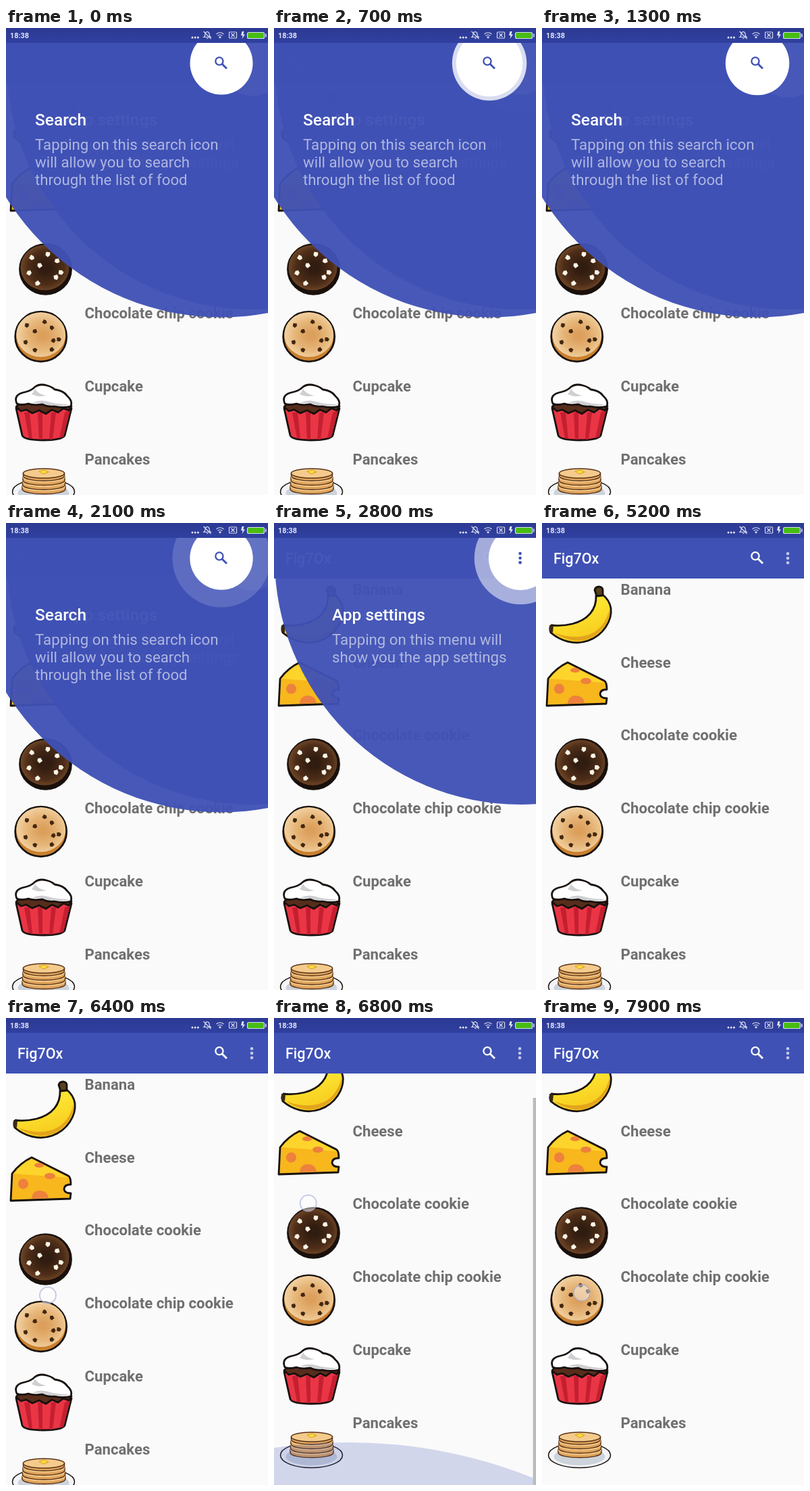
These frames come from a looping animation (388x690 px, 8 s). An HTML page:

```html
<!DOCTYPE html>
<html lang="en">
<head>
<meta charset="utf-8">
<title>Food list prompts</title>
<style>
  html, body { margin: 0; width: 100%; height: 100%; overflow: hidden; background: #fafafa; }
  svg { display: block; width: 388px; height: 690px; font-family: Roboto, "Noto Sans", sans-serif; }
  .label { font-size: 22.15px; font-weight: 700; fill: #6f6f6f; }
  .head { font-size: 24.5px; font-weight: 500; fill: #fff; }
  .body { font-size: 22.25px; fill: #fff; fill-opacity: .58; }
  .ink { stroke: #17110e; stroke-width: 2.8; stroke-linejoin: round; stroke-linecap: round; }
</style>
</head>
<body>
<svg viewBox="0 0 388 690">
  <defs>
    <clipPath id="listArea"><rect y="82" width="388" height="608"/></clipPath>
    <linearGradient id="peel" x1=".2" y1="0" x2=".6" y2="1">
      <stop offset=".4" stop-color="#fde22f"/><stop offset="1" stop-color="#f6c91c"/>
    </linearGradient>
    <radialGradient id="cocoa" cx=".52" cy=".5">
      <stop offset=".2" stop-color="#301c10"/><stop offset=".75" stop-color="#4d2d18"/><stop offset="1" stop-color="#6b4325"/>
    </radialGradient>
    <radialGradient id="dough" cx=".54" cy=".52">
      <stop offset=".15" stop-color="#dc9f5c"/><stop offset=".65" stop-color="#e6b679"/><stop offset="1" stop-color="#f0cd9c"/>
    </radialGradient>
    <linearGradient id="bar" x2="0" y2="1">
      <stop offset="0" stop-color="#2c3a93"/><stop offset="1" stop-color="#3040a0"/>
    </linearGradient>
    <g id="lens" fill="none" stroke-width="2.3">
      <circle cx="-2.6" cy="-2.7" r="5.6"/><path d="M1.6 1.5 8.4 8.3" stroke-width="2.9"/>
    </g>
    <g id="dots"><circle cy="-6.7" r="2.3"/><circle r="2.3"/><circle cy="6.7" r="2.3"/></g>
  </defs>

  <rect width="388" height="690" fill="#fafafa"/>
  <g clip-path="url(#listArea)">
    <g id="list">
      <g id="banana">
        <path class="ink" fill="url(#peel)" d="M80 107C81 128 68 143 45 149Q28 153 14 151Q10 155 13 162C27 174 48 181 68 174C91 166 104 144 102 126Q100 114 90 106Z"/>
        <path fill="#e3a41b" d="M18 162C34 173 52 177 67 172C87 165 101 146 100 128C95 147 84 161 66 166Q44 172 18 162Z"/>
        <path class="ink" fill="#59421d" stroke-width="2" d="M81 108 78 99Q79 94 85 94 90 95 90 99L90 107Z"/>
        <path fill="#3b2a14" d="M11 151 17 152 16 162 11 160Z"/>
      </g>
      <g id="cheese">
        <path class="ink" fill="#f7b71d" d="M9 230Q21 214 38 206L92 233Q96 235 96 246Q86 246 86 253Q87 259 96 259L95 267 7 270Z"/>
        <path fill="#fdd42b" d="M11 230Q23 215 38 208L93 236Z"/>
        <g fill="#ed813d">
          <ellipse cx="49" cy="217.500" rx="7" ry="3.600"/><ellipse cx="65" cy="233.500" rx="8" ry="4.500"/>
          <circle cx="25.500" cy="245" r="7.600"/><path d="M38 267Q39 255 50 255T63 266Z"/>
        </g>
      </g>
      <g id="darkCookie">
        <ellipse class="ink" cx="58.500" cy="356.500" rx="38" ry="36.800" fill="#1c100a"/>
        <ellipse cx="57.500" cy="354" rx="36" ry="33.500" fill="url(#cocoa)"/>
        <g id="whiteChips" fill="#fff5e6"/>
      </g>
      <g id="paleCookie">
        <ellipse class="ink" cx="51.700" cy="456" rx="38" ry="36.800" fill="#c9802f"/>
        <ellipse cx="51.700" cy="453" rx="36.500" ry="33" fill="url(#dough)"/>
        <g id="darkChips" fill="#43270f"/>
      </g>
      <g id="cupcake">
        <path class="ink" fill="#ea3545" d="M15 562 24 602Q27 609 55 609T87 602L97 562Z"/>
        <path fill="#c41f30" d="M27 568 34 606 39 607 35 568ZM47 568 49 608H54L54 568ZM67 568 64 608 69 608 74 568ZM87 568 79 606 85 604 95 565Z"/>
        <path class="ink" stroke-width="1.600" fill="#572d1b" d="M15 560Q18 552 54 555T97 559L93 565 85 562 77 568 68 564 59 570 49 565 39 569 30 564 22 566Z"/>
        <path class="ink" stroke-width="2.200" fill="#fff" d="M16 555Q11 543 24 539Q38 536 42 531Q49 525 60 528Q68 530 72 534Q86 536 91 544Q99 551 96 559Q84 562 72 559Q61 560 54 556Q41 558 33 555Q23 558 16 555Z"/>
        <path fill="#cfcfd3" d="M43 533Q47 541 60 543 47 546 38 541 41 538 43 533ZM38 554Q50 548 62 552T94 556Q84 560 72 557 61 558 54 554Z"/>
      </g>
      <g id="pancakes">
        <ellipse class="ink" cx="55.500" cy="685" rx="46" ry="18.500" style="stroke-width:1.500px" fill="#f2f4f7"/>
        <ellipse cx="55.500" cy="687" rx="38" ry="13" fill="#ccd3db"/>
        <g id="stack" stroke="#5a3318" stroke-width="1.500"/>
        <path fill="#ffdf38" stroke="#d29a20" d="M49 655 57 653 63 656 55 659Z"/>
      </g>
      <g id="labels" class="label"/>
    </g>
    <circle id="glow" cx="110" r="740" fill="#3f51b5"/>
    <rect id="thumb" x="383.500" y="118" width="4.500" height="572" fill="#bcbcbc"/>
  </g>

  <rect y="21" width="388" height="61" fill="#3f51b5"/>
  <text x="17" y="60" font-size="21.500" font-weight="500" fill="#fff">Fig7Ox</text>
  <use href="#lens" x="318.500" y="51.500" stroke="#fff"/>
  <use href="#dots" x="364" y="52" fill="#c3c9ea"/>

  <g id="prompts"></g>

  <rect width="388" height="22" fill="url(#bar)"/>
  <g fill="#e1e4f4">
    <text x="6" y="14.500" font-size="10.800" font-weight="700">18:38</text>
    <circle cx="276" cy="14" r="1.500"/><circle cx="280.200" cy="14" r="1.500"/><circle cx="284.400" cy="14" r="1.500"/>
    <path d="M349.500 5 348 11H350.500L349.500 16 354 9.500H351.300L352.500 5Z"/>
    <rect x="384" y="8.500" width="1.500" height="5"/>
  </g>
  <g fill="none" stroke="#d9dcf0" stroke-width="1.200">
    <path d="M293 13.500Q295 12 295 9Q295 6 298 5.500Q301 6 301 9Q301 12 303 13.500ZM297 15.500H299.500M292.500 5 303.500 16"/>
    <path d="M311.500 9Q317 4.500 322.500 9M313.500 11.500Q317 8.500 320.500 11.500"/><circle cx="317" cy="13.700" r="1"/>
    <rect x="330.500" y="6" width="11" height="9" rx="1"/><path d="M333.500 8 338.500 13M338.500 8 333.500 13"/>
    <rect x="357.500" y="6.500" width="25" height="9" rx="2" fill="#47bd12"/>
  </g>
  <circle id="touch" r="12" fill="#fff" fill-opacity=".45" stroke="#9fa6d8" stroke-opacity=".6" stroke-width="1.800"/>
</svg>
<script>
const LOOP = 8000, FOCAL = 46.5, PULSE = 1100, FINISH = 225;
const $ = id => document.getElementById(id);
const clamp = v => Math.max(0, Math.min(1, v));
const ease = p => (1 - Math.cos(Math.PI * clamp(p))) / 2;
const span = (t, a, b) => clamp((t - a) / (b - a));
const mix = (a, b, p) => a + (b - a) * p;

function set(el, attrs) {
  for (const name in attrs) el.setAttribute(name, attrs[name]);
}
function add(parent, tag, attrs, text = "") {
  const el = document.createElementNS("http://www.w3.org/2000/svg", tag);
  set(el, attrs);
  el.textContent = text;
  return parent.appendChild(el);
}

["Banana", "Cheese", "Chocolate cookie", "Chocolate chip cookie", "Cupcake", "Pancakes"]
  .forEach((name, i) => add($("labels"), "text", { x: 116.5, y: 105.8 + i * 107.8 }, name));

function sprinkle(id, points, size) {
  points.forEach(([x, y], i) => add($(id), "path", {
    d: "M-4 1-1-4 3-2 4 2 0 4Z",
    transform: `translate(${x} ${y}) rotate(${i * 67}) scale(${size})`
  }));
}
sprinkle("whiteChips", [[38, 339], [62, 334], [76, 344], [50, 351], [34, 362], [81, 361], [74, 368], [47, 377]], 1);
sprinkle("darkChips", [[57, 434], [31, 439], [43, 448], [68, 443], [70, 462], [78, 460], [29, 464], [68, 475], [43, 476]], .9);

for (let i = 0; i < 4; i++) {
  const y = 681 - i * 6.5, half = 32 - i * .5;
  add($("stack"), "path", {
    fill: "#dfa45c",
    d: `M${56 - half} ${y - 4}v4c0 10 ${2 * half} 10 ${2 * half} 0v-4z`
  });
  add($("stack"), "ellipse", { cx: 56, cy: y - 3.5, rx: half, ry: 7, fill: "#f4cb8c", stroke: i < 3 ? "none" : "#5a3318" });
}

function makePrompt({ x, radius, textX, title, lines, icon, phase, end }) {
  const y = 52;
  const root = add($("prompts"), "g", {});
  const shapes = add(root, "g", {});
  add(shapes, "circle", { cx: x, cy: y, r: radius, fill: "#3f51b5", "fill-opacity": .957 });
  const ripple = add(shapes, "circle", { cx: x, cy: y, fill: "#fff" });
  const focal = add(shapes, "circle", { cx: x, cy: y, fill: "#fff" });
  add(root, "use", { href: icon, x: x - .5, y: y - .3, fill: "#3f51b5", stroke: icon === "#lens" ? "#3f51b5" : "none" });
  add(root, "text", { class: "head", x: textX, y: 144 }, title);
  lines.forEach((line, i) => add(root, "text", { class: "body", x: textX, y: 180 + i * 26 }, line));

  return t => {
    const out = ease((t - end) / FINISH);
    const cycle = ((t + phase) % PULSE) / PULSE;
    const wave = ease(cycle);
    const swell = 1 + .1 * (1 - Math.abs(2 * wave - 1));
    const spread = cycle < .5 ? 0 : ease(cycle * 2 - 1);
    const grow = 1 + .25 * out;
    set(focal, { r: FOCAL * swell });
    set(ripple, {
      r: FOCAL * (1.1 + .5 * spread),
      "fill-opacity": cycle < .5 ? 0 : Math.min(.8, 2 * (1 - spread))
    });
    set(shapes, { transform: `translate(${x} ${y}) scale(${grow}) translate(${-x} ${-y})` });
    set(root, { opacity: 1 - out });
  };
}

const prompts = [
  makePrompt({
    x: 365, radius: 364, textX: 86, title: "App settings", icon: "#dots", phase: 311, end: 4300,
    lines: ["Tapping on this menu will", "show you the app settings"]
  }),
  makePrompt({
    x: 319, radius: 375.5, textX: 43, title: "Search", icon: "#lens", phase: 0, end: 2300,
    lines: ["Tapping on this search icon", "will allow you to search", "through the list of food"]
  })
];

// Each touch: start, end, from x, from y, to x, to y.
const touches = [
  [2150, 2300, 322, 70, 322, 70],
  [4120, 4300, 345, 77, 345, 77],
  [6400, 6900, 62, 410, 48, 240],
  [7800, 8000, 59, 406, 59, 406]
];

function render(t) {
  prompts.forEach(draw => draw(t));
  set($("list"), { transform: `translate(0 ${-39 * span(t, 6470, 6620)})` });

  const pull = span(t, 6600, 6800), recede = ease(span(t, 6900, 7500));
  set($("glow"), { cy: 690 - 63 * pull * (1 - recede) + 740, opacity: .21 * pull * (1 - recede) });
  set($("thumb"), { opacity: span(t, 6450, 6500) * (1 - span(t, 7100, 7350)) });

  const touch = touches.find(([a, b]) => t >= a && t < b);
  set($("touch"), { visibility: touch ? "visible" : "hidden" });
  if (touch) {
    const [a, b, x0, y0, x1, y1] = touch, p = span(t, a, b);
    set($("touch"), { cx: mix(x0, x1, p), cy: mix(y0, y1, p) });
  }
}

const start = performance.now();
function tick() {
  render((performance.now() - start) % LOOP);
  requestAnimationFrame(tick);
}
tick();
</script>
</body>
</html>
```
